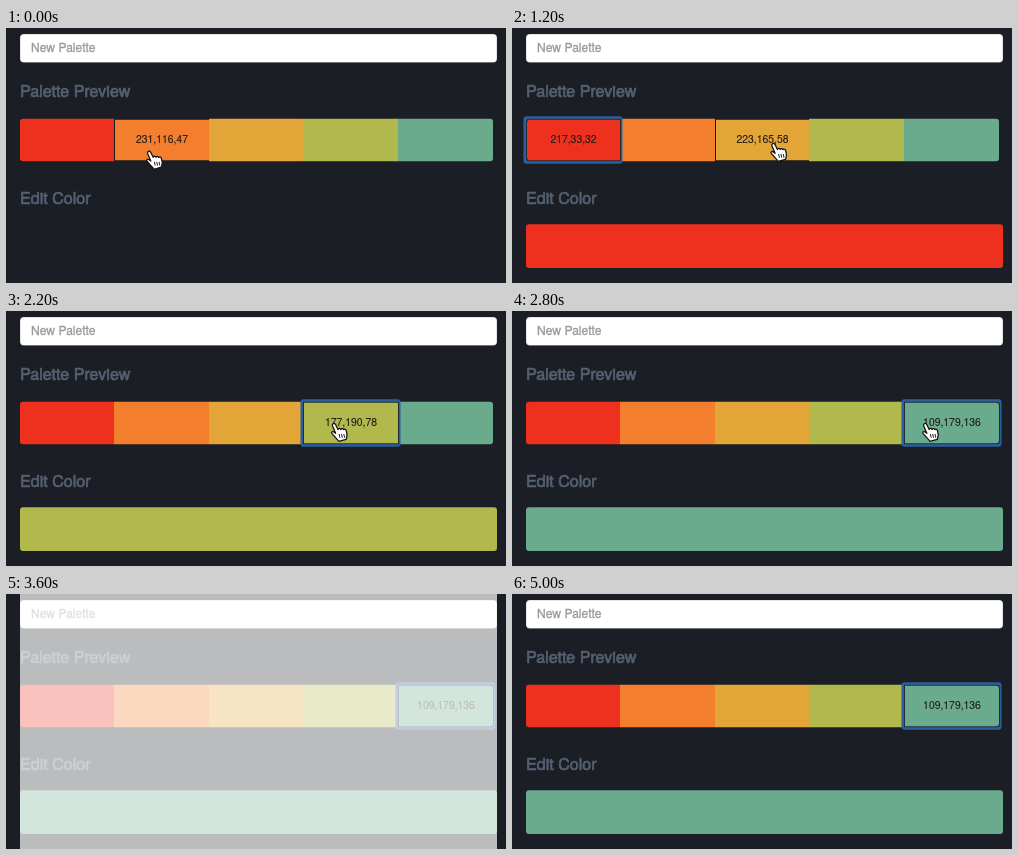
Write an HTML page with a canvas that moves like this. It is 500 by 255 pixels and loops after 5200 ms.

```html
<!DOCTYPE html>
<html lang="en">
<head>
<meta charset="utf-8">
<title>Palette editor</title>
<style>
html, body { margin: 0; width: 100%; height: 100%; overflow: hidden; background: #1b1e25; }
canvas { display: block; }
</style>
</head>
<body>
<canvas id="stage" width="500" height="255"></canvas>
<script>
const ctx = document.getElementById('stage').getContext('2d');
const LOOP = 5200, STEP = 200, EDIT_LAG = 100;
const FONT = '"Helvetica Neue", Helvetica, "Liberation Sans", Arial, sans-serif';
const LEFT = 14, TOP = 90.7, HEIGHT = 42.6, PITCH = 94.6, FULL = 477;

const swatches = [
  { fill: '#ee311e', label: '217,33,32' },
  { fill: '#f37e2d', label: '231,116,47' },
  { fill: '#e4a538', label: '223,165,58' },
  { fill: '#b1b84c', label: '177,190,78' },
  { fill: '#6bab8d', label: '109,179,136' }
];

const clicks = [
  { at: 50, pick: 1 }, { at: 780, pick: 0 }, { at: 1450, pick: 2 },
  { at: 2050, pick: 3 }, { at: 2580, pick: 4 }
];

// Pointer glides: each slows down towards its end point
const start = { x: 140.5, y: 122.5 };
const glides = [
  { from: 550, to: 800, x: 67.5, y: 118 },
  { from: 1000, to: 1260, x: 269.5, y: 114.5 },
  { from: 1800, to: 2200, x: 325.3, y: 111.7 },
  { from: 2200, to: 2500, x: 410.5, y: 111.7 },
  { from: 3000, to: 3400, x: 340, y: -25 }
];

const hand = new Path2D(
  'M1.2 3.2 C.2 1.2 2.6 -.2 3.9 1.6 L6.3 6.6 C6.6 5.2 8.6 5.2 9 6.6 ' +
  'C9.5 5.3 11.4 5.4 11.7 6.8 C12.4 5.9 14 6.4 14.1 7.8 L14.8 11.4 ' +
  'C15 13.4 14.3 14.4 14 16.2 L6.9 18.2 C6.3 16.2 4 14.8 2.8 13.1 ' +
  'L.5 10.4 C-.4 9 1.3 8 2.5 9 L4.1 10.3 Z');

function pickedAt(t) {
  const last = clicks.filter(c => c.at <= t).pop();
  return last ? last.pick : -1;
}

function pointerAt(t) {
  let { x, y } = start;
  for (const g of glides) {
    const u = Math.min(1, Math.max(0, (t - g.from) / (g.to - g.from)));
    const k = u * (2 - u);
    x += (g.x - x) * k;
    y += (g.y - y) * k;
  }
  return { x, y };
}

function box(x, y, w, h, r, fill) {
  ctx.beginPath();
  ctx.roundRect(x, y, w, h, r);
  ctx.fillStyle = fill;
  ctx.fill();
}

// weight thickens the glyphs a little
function text(str, x, y, size, color, weight, align = 'left') {
  ctx.font = `${size}px ${FONT}`;
  ctx.textAlign = align;
  ctx.fillStyle = ctx.strokeStyle = color;
  ctx.lineWidth = weight;
  ctx.fillText(str, x, y);
  ctx.strokeText(str, x, y);
}

function heading(str, y) {
  text(str, LEFT, y, 16.1, '#566071', 0.7);
}

function swatchX(i) {
  return Math.floor(LEFT + i * PITCH);
}

function drawSwatch(i, focused, hovered) {
  const x = swatchX(i), w = swatchX(i + 1) - x;
  const l = i === 0 ? 3 : 0, r = i === 4 ? 3 : 0;
  const corners = [l, r, r, l];
  const { fill, label } = swatches[i];
  if (focused) box(x - 2.5, TOP - 2.5, w + 5, HEIGHT + 5, 3, '#2a609f');
  if (focused || hovered) {
    box(x, TOP, w + 1, HEIGHT, corners, focused ? '#222b36' : '#17191c');
    box(x + 1, TOP + 1, w - 1, HEIGHT - 2, corners, fill);
    text(label, x + w / 2 + 0.5, 115, 10.4, '#201d18', 0.1, 'center');
  } else {
    box(x, TOP, w, HEIGHT, corners, fill);
  }
}

function drawPointer({ x, y }) {
  ctx.save();
  ctx.translate(x, y);
  ctx.scale(1.06, 1.03);
  ctx.lineJoin = 'round';
  ctx.fillStyle = '#fff';
  ctx.fill(hand);
  ctx.strokeStyle = '#111';
  ctx.lineWidth = 1.2;
  ctx.stroke(hand);
  ctx.lineWidth = 0.9;
  ctx.beginPath();
  for (let i = 0; i < 3; i++) {
    ctx.moveTo(7.4 + i * 2.2, 11);
    ctx.lineTo(8.2 + i * 2.2, 14.6);
  }
  ctx.stroke();
  ctx.restore();
}

function draw(t) {
  const focus = pickedAt(t);
  const edit = pickedAt(t - EDIT_LAG);
  const pointer = pointerAt(t);
  const hover = pointer.y > TOP ? Math.floor((pointer.x + 3 - LEFT) / PITCH) : -1;

  ctx.fillStyle = '#1b1e25';
  ctx.fillRect(0, 0, 500, 255);
  box(LEFT, 6, FULL, 28.5, 4, '#c9cbce');
  box(LEFT + 0.5, 6.5, FULL - 1, 27.5, 3.5, '#fff');
  text('New Palette', 25, 24, 12.1, '#999', 0.3);
  heading('Palette Preview', 69);
  heading('Edit Color', 176);

  swatches.forEach((s, i) => drawSwatch(i, false, i === hover));
  if (focus >= 0) drawSwatch(focus, true, false);
  if (edit >= 0) box(LEFT, 196.3, FULL, 43.7, 3, swatches[edit].fill);
  drawPointer(pointer);

  // Save flash
  if (t >= 3600 && t < 3800) {
    ctx.fillStyle = 'rgba(255,255,255,0.7)';
    ctx.fillRect(LEFT, 0, FULL, 255);
  }
}

const begin = performance.now();
function tick() {
  const t = (performance.now() - begin) % LOOP;
  draw(Math.floor(t / STEP) * STEP);
  requestAnimationFrame(tick);
}
tick();
</script>
</body>
</html>
```
